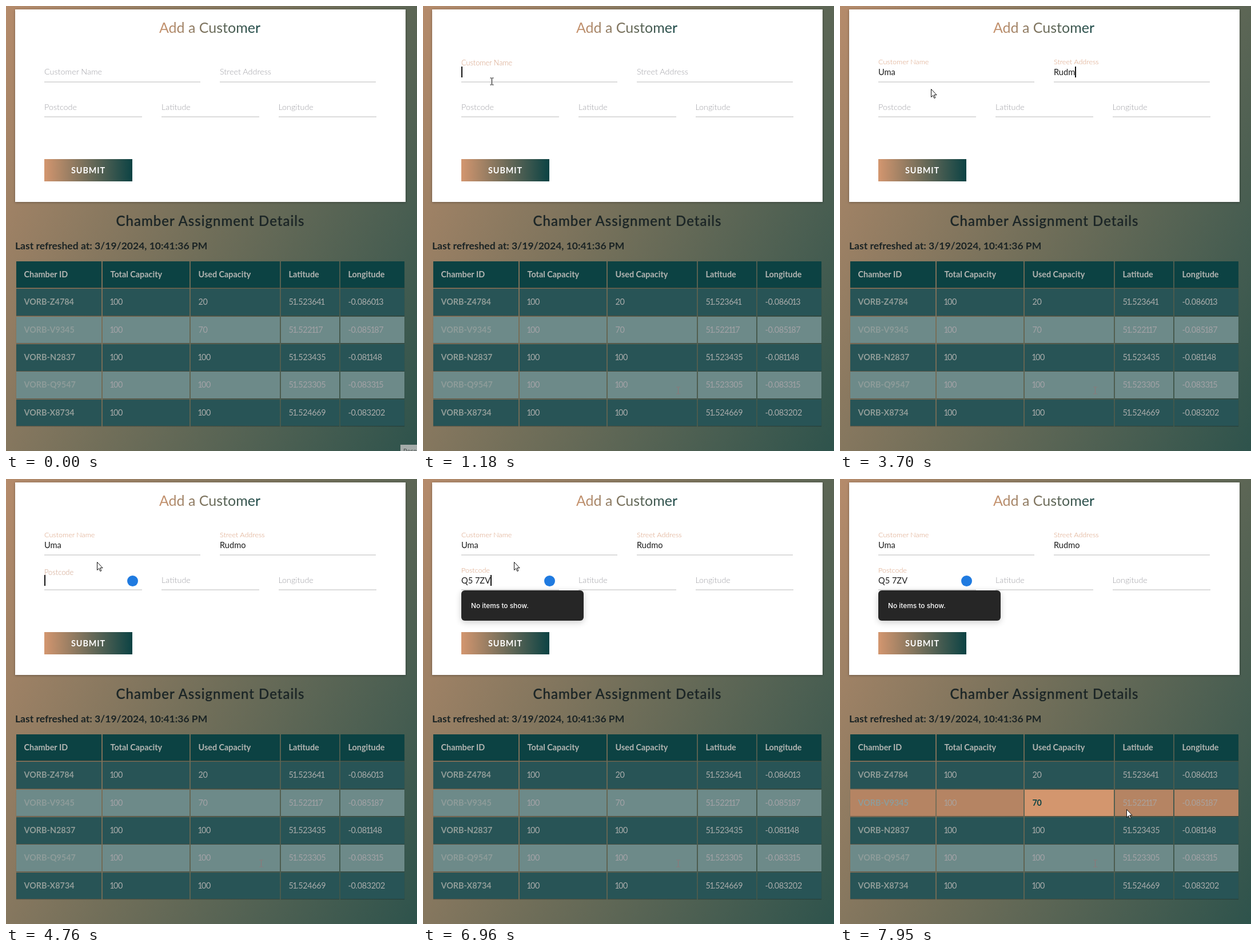
Recreate the animation shown at these times as an HTML page. Size 719 by 779 pixels, loop 8000 ms.

```html
<!DOCTYPE html>
<html lang="en">
<head>
<meta charset="utf-8">
<title>Add a Customer</title>
<style>
html, body { margin: 0; width: 100%; height: 100%; overflow: hidden; }
#stage {
  position: relative; width: 719px; height: 779px; overflow: hidden;
  font: 14.4px/20px Lato, "Open Sans", sans-serif;
  background: linear-gradient(116deg, #b58b6b, #706e59 50%, #2e534c);
}
#stage * { position: absolute; white-space: pre; }
#stage i, #stage .in { position: static; }
.card { left: 16px; top: 6px; width: 682.5px; height: 337px; background: #fff; box-shadow: 0 1px 4px #0005; }
.title { left: 0; width: 713px; text-align: center; top: 22px; font-size: 25px; line-height: 30px; }
.title span { background: linear-gradient(90deg, #c9946f, #1a4847); -webkit-background-clip: text; background-clip: text; color: transparent; }
.head { left: 0; width: 715px; text-align: center; top: 361px; font-size: 24px; line-height: 30px; font-weight: 500; letter-spacing: 1px; color: #1b2526; text-shadow: 0 0 1px #1b252699; }
.time { left: 16px; top: 410px; font-size: 17.5px; font-weight: 700; color: #1a2324; }
.line { height: 2px; background: #dcdcdc; }
.label { font-weight: 300; }
.value { font-size: 14.6px; color: #1c1c1c; }
.caret { left: 100%; top: 0; width: 1.5px; height: 19px; background: #111; }
.submit {
  left: 67px; top: 268px; width: 154px; height: 39px; line-height: 39px; text-align: center;
  background: linear-gradient(90deg, #d3966f, #0c4344); color: #fff; font-weight: 700; letter-spacing: .9px;
}
.mark { left: 211.5px; top: 168.5px; width: 19px; height: 19px; border-radius: 50%; background: #1f7ae0; }
.popup {
  left: 67px; top: 195px; width: 196.5px; height: 53px; padding-left: 17px; border-radius: 6px; background: #262626;
  color: #fff; font: 500 11.9px/53px Inter, sans-serif; box-shadow: 0 3px 12px #0003;
}
.tip { left: 690px; top: 768px; width: 40px; height: 20px; padding-left: 5px; background: #a5acaa; color: #454b4a; font-size: 11px; line-height: 22px; }
.cell { padding-left: 13.5px; box-sizing: border-box; line-height: 46px; height: 46.6px; letter-spacing: -.3px; color: #a9acab; background: #285456; box-shadow: 0 1px 1px #0004; }
.cell i { font-style: normal; margin: 0 -.09em; }
.even { background: #6d8a89; color: #a3a2a6; }
.id, .th { font-weight: 700; letter-spacing: 0; }
.id { color: #919d99; }
.even.id { color: #8e9c9a; }
.th { background: #0c4243; color: #b3b5b2; }
.row { background: #b58463; color: #aaa29d; }
.hot { background: #d3966e; color: #0c4243; font-weight: 700; }
svg { left: 0; top: 0; overflow: visible; width: 1px; height: 1px; }
.beam { mix-blend-mode: difference; fill: none; stroke: #fff; }
</style>
</head>
<body>
<div id="stage">
  <div class="card"></div>
  <div class="title"><span class="in">Add a Customer</span></div>
  <div class="submit">SUBMIT</div>
  <div class="head">Chamber Assignment Details</div>
  <div class="time">Last refreshed at: 3/19/2024, 10:41:36 PM</div>
</div>
<script>
const LOOP = 8000, BLINK = 530;
const stage = document.getElementById('stage');

function add(cls, style = {}, html = '', parent = stage) {
  const el = document.createElement('div');
  el.className = cls;
  el.innerHTML = html;
  for (const k in style) el.style[k] = typeof style[k] === 'number' ? style[k] + 'px' : style[k];
  parent.append(el);
  return el;
}
const show = (el, on) => el.style.display = on ? '' : 'none';
const mix = (a, b, p) => a + (b - a) * p;

// Form: x, width, middle of the label, label, then focus, blur, typed text and key times
const fields = [
  [67, 273, 115, 'Customer Name', 978, 2728, 'Uma', [2110, 2300, 2500]],
  [374, 273, 115, 'Street Address', 2728, 4610, 'Rudmo', [3100, 3360, 3560, 3700, 3900]],
  [67, 171, 176.5, 'Postcode', 4610, LOOP, 'Q5 7ZV', [5290, 5620, 6090, 6430, 6690, 6960]],
  [272, 171, 176.5, 'Latitude', Infinity, 0, '', []],
  [476.5, 171, 176.5, 'Longitude', Infinity, 0, '', []]
].map(([x, w, y, name, focus, blur, text, keys]) => {
  add('line', { left: x, top: y + 16.8, width: w });
  const label = add('label', { left: x }, name);
  const value = add('value', { left: x, top: y - 9, height: 20 });
  const typed = document.createElement('span');
  typed.className = 'in';
  value.append(typed);
  const caret = add('caret', {}, '', value);
  return { y, focus, blur, text, keys, label, typed, caret };
});

function drawField(f, t) {
  const p = Math.min(Math.max((t - f.focus) / 300, 0), 1);
  const e = 1 - (1 - p) ** 2.4;
  f.label.style.top = mix(f.y - 10, f.y - 26.8, e) + 'px';
  f.label.style.fontSize = mix(14.4, 12.6, e) + 'px';
  f.label.style.color = `rgb(${mix(160, 217, e)},${mix(160, 158, e)},${mix(166, 124, e)})`;
  const past = f.keys.filter(k => k <= t);
  f.typed.textContent = f.text.slice(0, past.length);
  const last = past.length ? past[past.length - 1] : f.focus;
  show(f.caret, t >= f.focus && t < f.blur && (t - last) % (2 * BLINK) < BLINK);
}

// Table
const colX = [18, 169, 323, 481, 585, 699];
const rowY = r => 446.8 + r * 48.4;
const table = [
  ['Chamber ID', 'Total Capacity', 'Used Capacity', 'Latitude', 'Longitude'],
  ['VORB-Z4784', 100, 20, '51.523641', '-0.086013'],
  ['VORB-V9345', 100, 70, '51.522117', '-0.085187'],
  ['VORB-N2837', 100, 100, '51.523435', '-0.081148'],
  ['VORB-Q9547', 100, 100, '51.523305', '-0.083315'],
  ['VORB-X8734', 100, 100, '51.524669', '-0.083202']
];
const cells = table.flatMap((row, r) => row.map((text, c) => {
  const cls = 'cell' + (r ? r % 2 ? '' : ' even' : ' th') + (c ? '' : ' id');
  const html = r && c ? String(text).replace(/1/g, '<i>1</i>') : text;
  const el = add(r ? cls : 'cell th', { left: colX[c], top: rowY(r), width: colX[c + 1] - colX[c] - 1.7 }, html);
  return { el, r, c, cls: el.className };
}));

function drawHover([x, y], on) {
  const row = on ? Math.floor((y - rowY(0)) / 48.4) : 0;
  for (const { el, r, c, cls } of cells) {
    const inRow = r > 0 && r === row;
    const inCell = inRow && c > 1 && x >= colX[c] && x < colX[c + 1];
    el.className = cls + (inRow ? ' row' : '') + (inCell ? ' hot' : '');
  }
}

const mark = add('mark');
const popup = add('popup', {}, 'No items to show.');
const tip = add('tip', {}, 'Reco');

// Pointer
function addSvg(cls, path) {
  stage.insertAdjacentHTML('beforeend', `<svg class="${cls}"><path d="${path}"/></svg>`);
  return stage.lastElementChild;
}
const beamPath = 'M-3-6h2.5M.5-6h2.5M0-5.5v11M-3 6h2.5M.5 6h2.5';
const trace = addSvg('beam', beamPath);
const beam = addSvg('beam', beamPath);
const arrow = addSvg('', 'M.5.5v14l3.2-3 2.2 5 2-.9-2.2-4.9h4.4z');
arrow.style.fill = '#fff';
arrow.style.stroke = '#111';
const place = (el, [x, y]) => el.style.transform = `translate(${x}px,${y}px)`;
place(trace, [446.5, 673]);

const path = [
  [70, 719, 779], [250, 446.5, 673], [380, 181.5, 400], [850, 120.5, 132],
  [1250, 120.5, 132], [1440, 159, 145], [7550, 159, 145], [7950, 501, 578]
];
function pointer(t) {
  const i = path.findIndex(k => k[0] > t);
  if (i < 1) return path[i ? path.length - 1 : 0].slice(1);
  const [a, b] = [path[i - 1], path[i]];
  const p = (t - a[0]) / (b[0] - a[0]);
  return [mix(a[1], b[1], p), mix(a[2], b[2], p)];
}

function draw(now) {
  const t = now % LOOP;
  fields.forEach(f => drawField(f, t));
  show(mark, t >= 4700);
  show(popup, t >= 5290);
  show(tip, t < 70);
  const at = pointer(t), isArrow = t >= 1350;
  place(beam, at);
  place(arrow, at);
  show(beam, t >= 70 && !isArrow);
  show(arrow, isArrow);
  show(trace, t >= 250);
  drawHover(pointer(Math.min(t, 7950) - 28), t >= 70); // hover trails the pointer
}
const start = performance.now();
function tick() {
  draw(performance.now() - start);
  requestAnimationFrame(tick);
}
tick();
</script>
</body>
</html>
```
